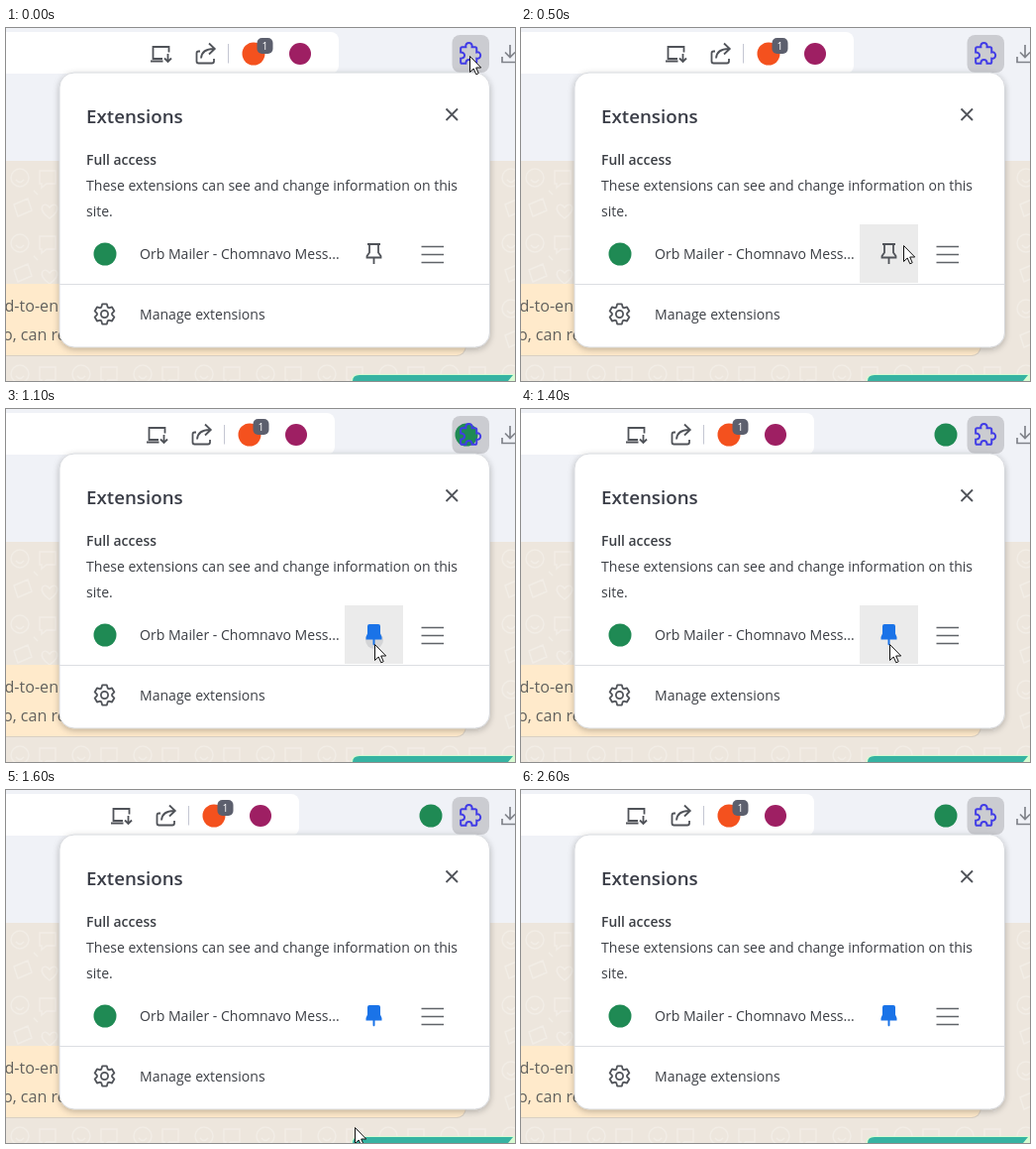
An HTML page for the animation above (2.7 s loop, 514x356 px).

```html
<!DOCTYPE html>
<html lang="en">
<head>
<meta charset="utf-8">
<title>Pin an extension</title>
<style>
  html, body { margin: 0; width: 100%; height: 100%; overflow: hidden; background: #f0f2f7; }
  svg { display: block; }
  text { font: 14.05px "Open Sans", "Noto Sans", sans-serif; fill: #3c3f45; }
  .title { font-size: 18.75px; font-weight: 600; fill: #3a3d47; }
  .label { font-size: 13.9px; font-weight: 600; }
  .chat { font-size: 16.1px; fill: #62625e; }
  .count { font-size: 10.5px; fill: #fff; text-anchor: middle; }
  .line { fill: none; stroke: #505359; stroke-width: 1.8; }

  /* Everything advances in 100 ms steps. */
  .step { animation: 2.7s step-end infinite; }
  #cursor { animation-name: move; }
  #tools { animation-name: slide; }
  #added { animation-name: slide-in; }
  #pinHover { animation-name: pin-hover; }
  #rowHover { animation-name: row-hover; }
  #ripple { animation-name: ripple; }
  #pinOff { animation-name: unpinned; }
  #pinOn { animation-name: pinned; }

  @keyframes move {
    0% { transform: translate(468px, 28px); opacity: 1; }
    7.4% { transform: translate(460px, 58px); opacity: 1; }
    11.1% { transform: translate(432px, 126px); opacity: 1; }
    14.8% { transform: translate(402px, 190px); opacity: 1; }
    18.5% { transform: translate(386px, 219px); opacity: 1; }
    22.2% { transform: translate(377px, 232px); opacity: 1; }
    25.9% { transform: translate(372px, 237px); opacity: 1; }
    55.5% { transform: translate(362px, 279px); opacity: 1; }
    59.2% { transform: translate(352px, 340px); opacity: 1; }
    62.9%, 100% { transform: translate(352px, 360px); opacity: 0; }
  }
  @keyframes slide {
    0% { transform: none; }
    40.7% { transform: translateX(-4px); }
    44.4% { transform: translateX(-22px); }
    48.1% { transform: translateX(-37px); }
    51.8%, 100% { transform: translateX(-40px); }
  }
  @keyframes slide-in {
    0% { transform: none; opacity: 0; }
    40.7% { transform: translateX(-4px); opacity: 1; }
    44.4% { transform: translateX(-22px); opacity: 1; }
    48.1% { transform: translateX(-37px); opacity: 1; }
    51.8%, 100% { transform: translateX(-40px); opacity: 1; }
  }
  @keyframes pin-hover { 0% { opacity: 0; } 18.5% { opacity: 1; } 55.5%, 100% { opacity: 0; } }
  @keyframes row-hover { 0% { opacity: 0; } 55.5% { opacity: 1; } 59.2%, 100% { opacity: 0; } }
  @keyframes ripple { 0% { opacity: 0; } 40.7% { opacity: 1; } 44.4%, 100% { opacity: 0; } }
  @keyframes unpinned { 0% { opacity: 1; } 40.7%, 100% { opacity: 0; } }
  @keyframes pinned { 0% { opacity: 0; } 40.7%, 100% { opacity: 1; } }
</style>
</head>
<body>
<svg width="514" height="356" viewBox="0 0 514 356">
  <defs>
    <pattern id="doodles" width="62" height="66" patternUnits="userSpaceOnUse" y="136">
      <g fill="none" stroke="#f2ede6" stroke-width="1.4">
        <circle cx="14" cy="15" r="9"/>
        <path d="M10 17q4 5 8 0M34 8h16v13h-9l-5 4v-4h-2zM8 42l14-6 4 12-14 6zM44 56c-14-9-6-19 0-11 6-8 14 2 0 11zM28 28l4 4"/>
      </g>
    </pattern>
    <filter id="shadow" x="-10%" y="-10%" width="120%" height="125%">
      <feDropShadow dx="0" dy="2" stdDeviation="3" flood-color="#000" flood-opacity=".25"/>
    </filter>
    <clipPath id="panelClip"><rect x="54" y="45" width="434.5" height="277" rx="15"/></clipPath>
  </defs>

  <!-- Page -->
  <rect width="514" height="356" fill="#f0f2f7"/>
  <rect y="134" width="514" height="222" fill="#ede6dd"/>
  <rect y="134" width="514" height="222" fill="url(#doodles)"/>
  <rect x="-20" y="259" width="484.5" height="72" rx="9" fill="#d9d0c4"/>
  <rect x="-20" y="258" width="484" height="72" rx="9" fill="#ffeacb"/>
  <text class="chat" x="-1.5" y="286">d-to-en</text>
  <text class="chat" x="-3" y="315">o, can re</text>
  <rect x="348" y="349" width="180" height="20" rx="8" fill="#d8fbd2"/>
  <path d="M350 356q0-6 7-6H512L507 356z" fill="#36b3a2"/>

  <!-- Toolbar -->
  <g id="tools" class="step">
    <rect x="-20" y="4" width="356" height="42" rx="8" fill="#fff"/>
    <rect x="-20" y="4" width="120" height="42" fill="#fff"/>
    <path class="line" d="M158 31H148.5V19H164.5V24.5M146 33.5H158.5M163.5 26V34M160 30.5l3.5 3.5 3.5-3.5"/>
    <path class="line" d="M196 23.5H194.5Q192.500 23.5 192.5 25.5V33.5Q192.5 35.5 194.5 35.5H208Q210 35.5 210 33.500V31M197 30.5C197.5 24 202 21 210 21M205 15.5l5.8 5.5-5.8 5.5"/>
    <path d="M224.5 16V35.5" stroke="#c4c6d2"/>
    <circle cx="250" cy="26" r="11.5" fill="#f4511e"/>
    <rect x="253.5" y="10" width="16" height="16" rx="5" fill="#5c5f6d"/>
    <text class="count" x="261.5" y="22">1</text>
    <circle cx="297" cy="26" r="11" fill="#9e1f63"/>
  </g>
  <rect x="450.5" y="7" width="37.5" height="38" rx="8" fill="#cbccd1"/>
  <circle id="added" class="step" cx="469" cy="26" r="11.5" fill="#1f8a54"/>
  <path transform="translate(468.5 26.5) scale(1.04)" fill="none" stroke="#403be6" stroke-width="1.9"
    d="M-7.5-7H-4C-5-12.5 3-12.5 2-7H5Q6.5-7 6.500-5.5V-2C11.5-3 11.5 5 6.5 4V7.5Q6.5 9 5 9H2C2 4-4 4-4 9H-7.5Q-9 9-9 7.5V4C-4 4-4-2-9-2V-5.5Q-9-7-7.5-7Z"/>
  <path fill="none" stroke="#80838a" stroke-width="1.7" d="M501 29V34.5H517V29M509 17V29M504 24.5l5 5 5-5"/>

  <!-- Panel -->
  <rect x="54" y="45" width="434.5" height="277" rx="15" fill="#fff" stroke="#cfd1d6" stroke-width=".8" filter="url(#shadow)"/>
  <g clip-path="url(#panelClip)">
    <rect id="rowHover" class="step" x="54" y="259" width="435" height="59" fill="#e3e4e8"/>
    <path d="M54 258.5H489" stroke="#dcdee2"/>
  </g>
  <text class="title" x="81" y="95.5">Extensions</text>
  <path class="line" d="M444.500 81.500l11.500 11.500m0-11.500l-11.500 11.500"/>
  <text class="label" x="81" y="138">Full access</text>
  <text x="81" y="164">These extensions can see and change information on this</text>
  <text x="81" y="190">site.</text>

  <circle cx="100" cy="228" r="11.5" fill="#1f8a54"/>
  <text x="135" y="233">Orb Mailer - Chomnavo Mess...</text>
  <rect id="pinHover" class="step" x="342" y="198" width="59" height="59" fill="#ebebeb"/>
  <circle id="ripple" class="step" cx="372" cy="233" r="9" fill="#d3d4d6"/>
  <path id="pinOff" class="step line" d="M365 218H378M367 218V226.5L364.5 230V231.5H378.5V230L376 226.5V218M371.5 231.5V238"/>
  <path id="pinOn" class="step" fill="#1a73e8" d="M365 219q0-2 2-2h9q2 0 2 2v7.500l1.500 3.500v2.500h-7v5l-1 1-1-1v-5h-7v-2.500l1.500-3.500z"/>
  <path d="M419.5 220.5H442M419.5 228.5H442M419.5 236.5H442" stroke="#5f6368" stroke-width="1.5"/>

  <g transform="translate(99.5 288.5)" class="line" stroke-linejoin="round">
    <path id="gear"/>
    <circle r="3.6"/>
  </g>
  <text x="135" y="294">Manage extensions</text>

  <path id="cursor" class="step" d="M.5.5V16.5L4.2 13 6.8 18.8 9.2 17.7 6.7 12H11.7Z" fill="#fff" stroke="#111"/>
</svg>
<script>
  // Six-toothed gear outline: [angle offset, radius] for one tooth, repeated.
  const tooth = [[-25, 7.6], [-13, 10.3], [13, 10.3], [25, 7.6]];
  const points = [];
  for (let turn = 0; turn < 360; turn += 60) {
    for (const [offset, r] of tooth) {
      const a = (turn + offset - 90) * Math.PI / 180;
      points.push((r * Math.cos(a)).toFixed(2) + " " + (r * Math.sin(a)).toFixed(2));
    }
  }
  document.getElementById("gear").setAttribute("d", "M" + points.join("L") + "Z");
</script>
</body>
</html>
```
